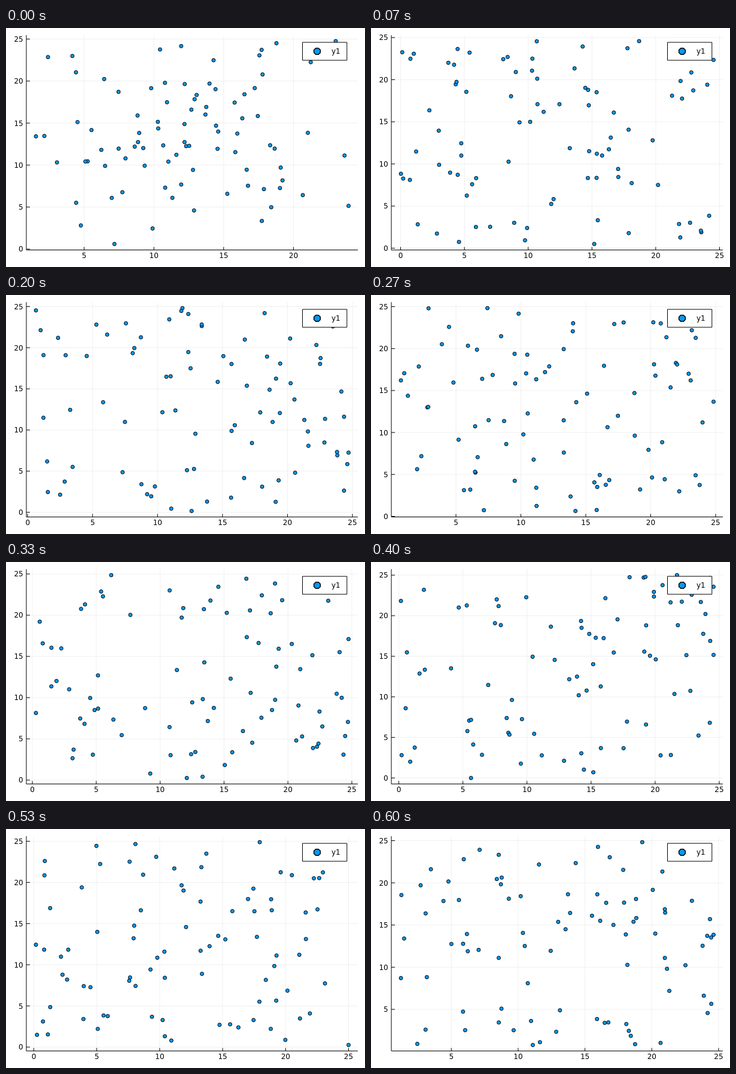
An HTML page with a canvas for the animation above (670 ms loop, 600 by 400 pixels).

```html
<!DOCTYPE html>
<html lang="en">
<head>
<meta charset="utf-8">
<title>Scatter</title>
<style>
html, body { margin: 0; width: 100%; height: 100%; overflow: hidden; background: #fff; }
canvas { display: block; width: 600px; height: 400px; }
</style>
</head>
<body>
<canvas id="plot" width="600" height="400"></canvas>
<script>
const ctx = document.getElementById('plot').getContext('2d');
const LOOP = 670;
const FPS = 15;
const MAX = 25;
const COUNT = 87;
const BLUE = '#009afa';
const AREA = { left: 34, right: 588, top: 12, bottom: 371.5 };
const DATA = { left: 50, right: 572.5, top: 22, bottom: 361.5 };

// Pixels of the values 0 and MAX on each axis, one view per step.
const views = [
  { x: [14, 597], y: [370, 18.5] },
  { x: [49.5, 582.5], y: [368.5, 16] },
  { x: [42, 577], y: [366, 19] },
  { x: [36.2, 579], y: [363.7, 19.3] },
  { x: [33.5, 576], y: [370.5, 19.5] },
  { x: [44, 578], y: [365, 20] },
  { x: [46.5, 582], y: [361.5, 22] },
  { x: [41, 576], y: [367, 20] },
  { x: [46.5, 572.5], y: [365, 20.5] },
  { x: [22.5, 581], y: [372.5, 19.5] }
];

// Steps begin on whole hundredths of a second.
const startOf = i => Math.round(i * 100 / FPS) * 10;

function makeRandom(seed) {
  return () => {
    seed = (seed + 0x6d2b79f5) | 0;
    let t = Math.imul(seed ^ (seed >>> 15), seed | 1);
    t ^= t + Math.imul(t ^ (t >>> 7), t | 61);
    return ((t ^ (t >>> 14)) >>> 0) / 4294967296;
  };
}

// Stretches values so that the outermost ones touch both limits.
function fit(values, from, to) {
  const low = Math.min(...values);
  const high = Math.max(...values);
  return values.map(v => from + (to - from) * (v - low) / (high - low));
}

// The first cloud is bell-shaped, all others are even.
function scatter(i) {
  const rnd = makeRandom(40 + i * 17);
  const spread = i === 0 ? () => (rnd() + rnd()) / 2 : rnd;
  const sample = () => Array.from({ length: COUNT }, spread);
  const xs = fit(sample(), DATA.left, DATA.right);
  const ys = fit(sample(), DATA.top, DATA.bottom);
  return xs.map((x, k) => [x, ys[k]]);
}

const clouds = views.map((view, i) => scatter(i));

function line(x1, y1, x2, y2, color) {
  ctx.strokeStyle = color;
  ctx.lineWidth = 1;
  ctx.beginPath();
  ctx.moveTo(x1, y1);
  ctx.lineTo(x2, y2);
  ctx.stroke();
}

function paint(width) {
  ctx.fillStyle = BLUE;
  ctx.fill();
  ctx.strokeStyle = '#000';
  ctx.lineWidth = width;
  ctx.stroke();
}

function dot(x, y) {
  ctx.beginPath();
  ctx.arc(x, y, 3, 0, Math.PI * 2);
  paint(1);
}

function octagon(x, y, r) {
  ctx.beginPath();
  for (let k = 0; k < 8; k++) {
    const a = (k + 0.5) * Math.PI / 4;
    ctx.lineTo(x + r * Math.cos(a), y + r * Math.sin(a));
  }
  ctx.closePath();
  paint(1.5);
}

function label(text, x, y, align) {
  ctx.fillStyle = '#000';
  ctx.textAlign = align;
  ctx.fillText(text, x, y);
}

function ticks([zero, end], low, high) {
  const list = [];
  for (let value = 0; value <= MAX; value += 5) {
    const pos = zero + (end - zero) * value / MAX;
    if (pos >= low && pos <= high) list.push({ value, pos });
  }
  return list;
}

function drawAxes(view) {
  const { left, right, top, bottom } = AREA;
  const xs = ticks(view.x, left, right);
  const ys = ticks(view.y, top, bottom);
  const grid = '#f0f0f0';

  xs.forEach(t => line(t.pos, top, t.pos, bottom, grid));
  ys.forEach(t => line(left, t.pos, right, t.pos, grid));
  line(left, bottom, right, bottom, '#000');
  line(left, top, left, bottom, '#000');
  xs.forEach(t => {
    line(t.pos, bottom, t.pos, bottom - 5, '#000');
    label(t.value, t.pos, 385, 'center');
  });
  ys.forEach(t => {
    line(left, t.pos, left + 6, t.pos, '#000');
    label(t.value, 28.7, t.pos + 4.4, 'right');
  });
}

function drawLegend() {
  ctx.fillStyle = '#fff';
  ctx.strokeStyle = '#000';
  ctx.lineWidth = 1;
  ctx.beginPath();
  ctx.rect(495.5, 24, 74.3, 30);
  ctx.fill();
  ctx.stroke();
  octagon(520, 39, 5.8);
  label('y1', 544, 43.2, 'left');
}

function draw(time) {
  let i = views.length - 1;
  while (startOf(i) > time) i--;
  ctx.fillStyle = '#fff';
  ctx.fillRect(0, 0, 600, 400);
  ctx.font = '12px "DejaVu Sans", sans-serif';
  drawAxes(views[i]);
  clouds[i].forEach(([x, y]) => dot(x, y));
  drawLegend();
}

const start = performance.now();
function tick() {
  draw((performance.now() - start) % LOOP);
  requestAnimationFrame(tick);
}
tick();
</script>
</body>
</html>
```
